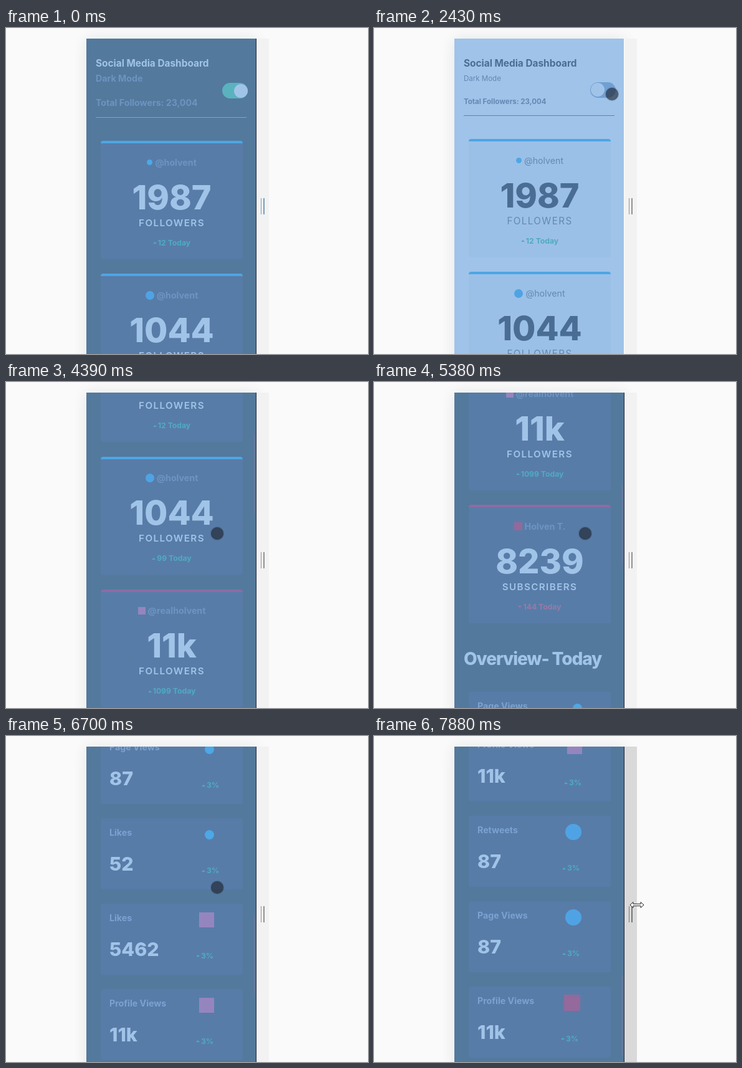
An HTML page for the animation above (8 s loop, 581x523 px).

```html
<!DOCTYPE html>
<html lang="en">
<head>
<meta charset="utf-8">
<title>Social Media Dashboard</title>
<style>
html, body { margin: 0; width: 100%; height: 100%; overflow: hidden; background: #fafafa; }
body { position: relative; font: 700 14.2px Inter, sans-serif; }
#frame { position: absolute; left: 129px; top: 17px; width: 293px; height: 560px; }
#bar { position: absolute; left: 273px; top: 0; width: 20px; height: 100%; }
#bar i { position: absolute; left: 7px; top: 256px; width: 6px; height: 26px; background: linear-gradient(90deg, currentColor 1.5px, transparent 1.5px 4.5px, currentColor 4.5px); }
#view {
  --p: calc(var(--t) * 100%);
  --text: color-mix(in srgb, #4a6d94 var(--p), #a0c4e8);
  --muted: color-mix(in srgb, #6388b2 var(--p), #6d94c2);
  --card: color-mix(in srgb, #9bc0e7 var(--p), #587ca8);
  position: absolute; width: 272px; height: 100%; overflow: hidden; color: var(--text);
  background: color-mix(in srgb, #9fc3e9 var(--p), #53799d);
  border-right: 1px solid color-mix(in srgb, #fff var(--p), #14233d);
  box-shadow: 0 0 22px rgba(0,0,0,.09);
}
#page { position: absolute; width: 100%; }
#main { position: absolute; top: calc(var(--t) * -3px); width: 100%; }
.line { position: absolute; display: flex; align-items: center; height: 0; line-height: 0; white-space: nowrap; }
.mid { left: 0; right: 0; justify-content: center; }
.muted { color: var(--muted); }
.shrink { font-size: calc(14.2px - 2.7px * var(--t)); }
.thin { font-weight: calc(700 - 300 * var(--t)); }
.card { position: absolute; left: 23px; width: 228px; border-radius: 4px; background: var(--card); }
.top { height: 189.5px; background: linear-gradient(var(--c) 4px, var(--card) 4px); }
.small { height: 114px; }
.count { font-size: 54px; font-weight: 800; }
.unit { font-size: 15.2px; font-weight: calc(560 - 160 * var(--t)); letter-spacing: 1.4px; color: color-mix(in srgb, #6388b2 var(--p), #a0c4e8); }
.heading { left: 15px; font-size: 28px; font-weight: 800; letter-spacing: -1.1px; }
.up, .down { font-size: 12.2px; gap: 2px; color: #50aac2; }
.down { color: #967ba8; }
.up::before, .down::before { content: ""; border: 3px solid transparent; border-top: 0; border-bottom-color: currentColor; }
.down::before { border-bottom: 0; border-top: 3px solid; }
.icon { border-radius: 50%; }
.square { border-radius: 0; }
hr { position: absolute; left: 15px; top: 126px; width: 242px; height: 1px; margin: 0; border: 0; background: color-mix(in srgb, #5d83ae var(--p), #7fa4cf); }
#toggle { position: absolute; left: 218px; top: calc(71px - 1.5px * var(--t)); width: 41px; height: 25px; border-radius: 13px; background: color-mix(in srgb, #719fd1 var(--p), #5bb2bf); }
#toggle i { position: absolute; left: calc(19px - 18px * var(--t)); top: 1.5px; width: 22px; height: 22px; border-radius: 50%; background: #a0c4e8; }
#thumb { position: absolute; left: 268px; width: 3px; height: 128px; border-radius: 2px; background: #6d7899; opacity: .45; }
svg { position: absolute; left: 0; top: 0; }
</style>
</head>
<body>
<div id="frame">
  <div id="view">
    <div id="page">
      <div class="line" style="left:15px;top:39.5px;font-size:15.4px">Social Media Dashboard</div>
      <div class="line muted shrink thin" style="left:15px;top:64px">Dark Mode</div>
      <div class="line muted shrink" style="left:15px;top:calc(103px - 2px * var(--t))">Total Followers: 23,004</div>
      <div id="toggle"><i></i></div>
      <div id="main"><hr></div>
    </div>
    <div id="thumb"></div>
  </div>
  <div id="bar"><i></i></div>
</div>
<svg width="581" height="523">
  <g id="pointer">
    <circle id="touch" r="10" fill="#191e26" fill-opacity=".6" stroke="#2b3a4c" stroke-opacity=".25" stroke-width="2"/>
    <path id="arrow" d="M0 0V16L4 12.500 6.500 18.500 9 17.500 6.500 11.500H11.500Z" fill="#fff" stroke="#000"/>
    <path id="resize" d="M-11 0L-6-4.500V-1.500H6V-4.500L11 0 6 4.500V1.500H-6V4.500Z" fill="#fff" stroke="#222"/>
  </g>
</svg>
<script>
const $ = id => document.getElementById(id);

// Icon kinds: colour, small size, large width, shape
const kinds = {
  f: ['#4ca8e6', 9, 15, ''],
  t: ['#4fa3e4', 14, 27, ''],
  i: ['#9585be', 12, 24, 'square'],
  y: ['#94699b', 13, 29, 'square']
};

const icon = (kind, size, style = '') =>
  `<i class="icon ${kinds[kind][3]}" style="width:${size}px;height:${size}px;background:${kinds[kind][0]};${style}"></i>`;
const line = (cls, top, html, style = '') =>
  `<div class="line ${cls}" style="top:${top}px;${style}">${html}</div>`;

const accounts = [
  ['f', '@holvent', '1987', 'FOLLOWERS', 'up', 12],
  ['t', '@holvent', '1044', 'FOLLOWERS', 'up', 99],
  ['i', '@realholvent', '11k', 'FOLLOWERS', 'up', 1099],
  ['y', 'Holven T.', '8239', 'SUBSCRIBERS', 'down', 144]
];
const stats = [
  ['f', 'Page Views', '87'], ['f', 'Likes', '52'], ['i', 'Likes', '5462'], ['i', 'Profile Views', '11k'],
  ['t', 'Retweets', '87'], ['t', 'Page Views', '87'], ['y', 'Profile Views', '11k']
];

let html = accounts.map(([kind, name, count, unit, dir, n], i) =>
  `<div class="card top" style="top:${164 + 213 * i}px;--c:${'ft'.includes(kind) ? '#4ca6e4' : '#8f6ba3'}">` +
  line('mid muted thin', 34.5, icon(kind, kinds[kind][1], 'margin-right:4px') + name) +
  line('mid count', 90.5, count) +
  line('mid unit', 131.5, unit) +
  line('mid ' + dir, 163.5, n + ' Today') + '</div>').join('');
html += line('heading', 1050, 'Overview- Today');
html += stats.map(([kind, label, count], i) => {
  const width = kinds[kind][2], left = 182 - width;
  return `<div class="card small" style="top:${1103 + 136.8 * i}px">` +
    line('', 23, label, 'left:14px;color:#7aa2d3') +
    line('', 73, count, 'left:14px;font-size:30.4px;font-weight:800') +
    line('', 26, icon(kind, Math.min(width, 26)), `left:${left}px`) +
    line('up', 84, '3%', `left:${left - 5}px`) + '</div>';
}).join('');
$('main').insertAdjacentHTML('beforeend', html);

// Eased value between [time, value] keys
function at(time, keys) {
  let [t0, v0] = keys[0];
  for (const [t1, v1] of keys) {
    if (time < t1) {
      const u = Math.max(0, (time - t0) / (t1 - t0));
      return v0 + (v1 - v0) * u * u * (3 - 2 * u);
    }
    [t0, v0] = [t1, v1];
  }
  return v0;
}

const theme = [[1460, 0], [2280, 1], [2910, 1], [3740, 0]];
const scroll = [[4090, 0], [4520, 350], [4700, 350], [5380, 623], [5560, 623], [6070, 896],
  [6330, 896], [7170, 1450], [7600, 1539]];
const pointerX = [[200, 480], [570, 398], [830, 398], [970, 372], [1520, 372], [1900, 382],
  [3740, 382], [4050, 339], [7450, 339], [7880, 422]];
const pointerY = [[200, 480], [570, 114], [830, 114], [970, 107], [1520, 107], [1900, 106],
  [3740, 106], [4050, 243], [7450, 243], [7880, 271]];

function draw(now) {
  const time = now % 8000;
  const x = at(time, pointerX), y = at(time, pointerY), top = at(time, scroll);
  const inside = x < 402, onBar = !inside && x <= 422;
  const show = (id, on) => $(id).style.display = on ? '' : 'none';

  $('view').style.setProperty('--t', at(time, theme));
  $('page').style.top = -top + 'px';
  $('thumb').style.top = top * 0.239 + 'px';
  show('thumb', top > 0);
  $('bar').style.background = onBar ? '#d9d9d9' : '#f2f2f2';
  $('bar').style.color = time < 260 ? '#7d9dbd' : onBar ? '#777' : '#929292';

  $('pointer').setAttribute('transform', `translate(${x} ${y})`);
  show('pointer', time >= 260);
  show('touch', inside);
  show('arrow', !inside && !onBar);
  show('resize', onBar);
  $('touch').setAttribute('r', time >= 1210 && time < 1520 ? 11 : 10);
  requestAnimationFrame(draw);
}
requestAnimationFrame(draw);
</script>
</body>
</html>
```
